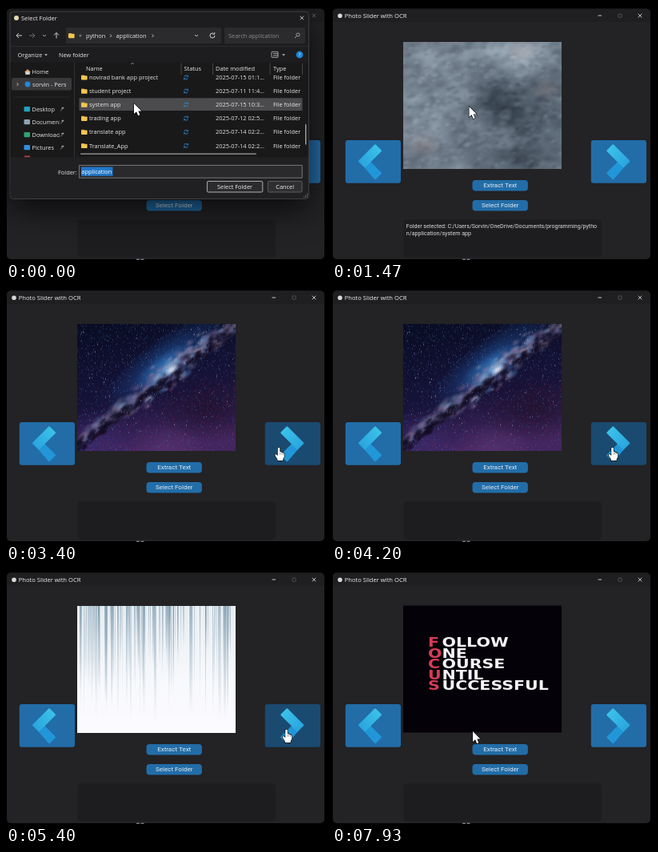
An HTML page with a canvas that plays this animation: 400 px wide and 318 px high, repeating every 8 s.

```html
<!DOCTYPE html>
<html lang="en">
<head>
<meta charset="utf-8">
<title>Photo Slider with OCR</title>
<style>
  html, body { margin: 0; width: 100%; height: 100%; overflow: hidden; background: #000; }
  canvas { display: block; width: 400px; height: 318px; }
</style>
</head>
<body>
<canvas id="stage"></canvas>
<script>
const W = 400, H = 318, LOOP = 8000;
const canvas = document.getElementById('stage');
const dpr = window.devicePixelRatio || 1;
canvas.width = W * dpr;
canvas.height = H * dpr;
const c = canvas.getContext('2d');
const UI = '"Open Sans", "Noto Sans", sans-serif';
const PIC = { x: 89, y: 44.5, w: 198, h: 159 };
const BLUE = '#226da8', HOVER = '#1a4a70';

// ---------- helpers ----------
function random(seed) {
  return () => {
    seed = (seed + 0x6D2B79F5) | 0;
    let n = Math.imul(seed ^ (seed >>> 15), 1 | seed);
    n = (n + Math.imul(n ^ (n >>> 7), 61 | n)) ^ n;
    return ((n ^ (n >>> 14)) >>> 0) / 4294967296;
  };
}

function box(x, y, w, h, fill, r = 0, stroke) {
  c.beginPath();
  c.roundRect(x, y, w, h, r);
  if (fill) { c.fillStyle = fill; c.fill(); }
  if (stroke) { c.strokeStyle = stroke; c.lineWidth = 0.8; c.stroke(); }
}

function dot(x, y, r, fill) {
  c.beginPath();
  c.arc(x, y, r, 0, 7);
  c.fillStyle = fill;
  c.fill();
}

function trace(points, close) {
  c.beginPath();
  for (let i = 0; i < points.length; i += 2) c.lineTo(points[i], points[i + 1]);
  if (close) c.closePath();
}

function line(color, width, ...points) {
  trace(points);
  c.strokeStyle = color;
  c.lineWidth = width;
  c.stroke();
}

// y is the middle of the capitals
function label(s, x, y, color = '#e8e8e8', size = 7.4, font = UI, align = 'left') {
  c.font = `${size}px ${font}`;
  c.textAlign = align;
  c.fillStyle = color;
  c.fillText(s, x, y + size * 0.36);
}

function clipped(s, x, y, right) {
  c.save();
  c.beginPath();
  c.rect(x, y - 8, right - x, 16);
  c.clip();
  label(s, x, y);
  c.restore();
}

function chevron(x, y, dx, dy, color = '#d0d0d0') {
  // points along (dx, dy)
  line(color, 0.9, x - dx - dy * 2, y - dy - dx * 2, x + dx, y + dy, x - dx + dy * 2, y - dy + dx * 2);
}

// ---------- pictures ----------
function picture(paint) {
  const p = document.createElement('canvas');
  p.width = PIC.w;
  p.height = PIC.h;
  paint(p.getContext('2d'), PIC.w, PIC.h);
  return p;
}

function soft(g, x, y, rx, ry, turn, rgb, alpha) {
  g.save();
  g.translate(x, y);
  g.rotate(turn);
  g.scale(rx, ry);
  const f = g.createRadialGradient(0, 0, 0, 0, 0, 1);
  f.addColorStop(0, `rgba(${rgb},${alpha})`);
  f.addColorStop(1, `rgba(${rgb},0)`);
  g.fillStyle = f;
  g.fillRect(-1, -1, 2, 2);
  g.restore();
}

const clouds = picture((g, w, h) => {
  const rnd = random(11);
  const bump = (x, y, cx, cy, s) => Math.exp(-((x - cx) ** 2 + (y - cy) ** 2) / (s * s));
  const light = (x, y) => 0.54 + 0.14 * bump(x, y, 45, 30, 45) + 0.34 * bump(x, y, 145, 15, 32)
    + 0.1 * bump(x, y, 25, 110, 40) - 0.32 * bump(x, y, 118, 72, 32)
    - 0.24 * bump(x, y, 165, 75, 34) - 0.26 * bump(x, y, 150, 152, 42);
  const tone = l => [34 + 138 * l, 44 + 142 * l, 56 + 144 * l].map(v => Math.round(v)).join();
  g.fillStyle = '#6f8799';
  g.fillRect(0, 0, w, h);
  for (let i = 0; i < 2200; i++) {
    const x = rnd() * w, y = rnd() * h, r = 2.5 + 20 * (1 - i / 2200) ** 2 * (0.4 + rnd());
    const l = Math.max(0, Math.min(1, light(x, y) + (rnd() - 0.5) * 0.65));
    soft(g, x, y, r * 1.6, r, -0.5 + rnd() * 0.5, tone(l), 0.36);
  }
  soft(g, 25, 130, 22, 15, 0, '180,150,140', 0.3);
  soft(g, 178, 60, 20, 14, 0, '170,140,135', 0.25);
  soft(g, 148, 12, 22, 14, 0, '196,188,186', 0.4);
});

const galaxy = picture((g, w, h) => {
  const rnd = random(5);
  const bell = () => rnd() + rnd() + rnd() - 1.5;
  const ridge = x => 149 - 0.75 * x;
  const TILT = -0.64;
  const sky = g.createLinearGradient(40, 0, 70, h);
  sky.addColorStop(0, '#090d24');
  sky.addColorStop(0.6, '#17133a');
  sky.addColorStop(1, '#43265f');
  g.fillStyle = sky;
  g.fillRect(0, 0, w, h);
  soft(g, 165, 105, 75, 45, 0, '32,17,44', 0.8);
  soft(g, 20, 150, 60, 40, 0, '60,46,120', 0.5);
  soft(g, 112, 158, 50, 36, 0, '96,58,118', 0.5);
  soft(g, 110, 48, 92, 30, TILT, '30,84,158', 0.75);
  soft(g, 108, 54, 46, 15, TILT, '62,140,208', 0.6);

  const tints = ['150,132,162', '84,138,190', '104,82,132', '168,152,172'];
  for (let i = 0; i < 520; i++) {
    const x = rnd() * 210 - 5, near = Math.exp(-(((x - 122) / 55) ** 2)), r = 1.5 + rnd() * 4;
    soft(g, x, ridge(x) + bell() * (9 + 10 * near), r * 1.7, r, TILT, tints[i % 4], 0.2 + 0.3 * near);
  }
  for (let i = 0; i < 190; i++) {
    const x = rnd() * 205, r = 1.5 + rnd() * 3.5;
    soft(g, x, ridge(x) + 6 + bell() * 9, r * 1.9, r, TILT + bell() * 0.5, '17,10,32', 0.75);
  }
  soft(g, 113, 58, 26, 9, TILT, '130,190,235', 0.6);
  soft(g, 118, 58, 10, 5, TILT, '240,242,252', 0.9);

  for (let i = 0; i < 2200; i++) {
    const x = rnd() * w, y = rnd() * h, low = y > ridge(x) + 20 ? y / h : 0;
    g.fillStyle = rnd() < low * 0.6 ? '#8f2c52' : ['#3168a0', '#28467c', '#4a88ba', '#6f72a8'][i % 4];
    g.globalAlpha = 0.15 + rnd() * 0.5;
    g.fillRect(Math.floor(x), Math.floor(y), 1, 1);
  }
  g.fillStyle = '#dfe6ff';
  for (let i = 0; i < 80; i++) {
    g.globalAlpha = 0.25 + rnd() * 0.5;
    g.fillRect(Math.floor(rnd() * w), Math.floor(rnd() * h), 1, 1);
  }
});

const streaks = picture((g, w, h) => {
  const rnd = random(23);
  const back = g.createLinearGradient(0, 0, 0, h);
  back.addColorStop(0, '#e6edf2');
  back.addColorStop(0.6, '#f8f9fc');
  back.addColorStop(1, '#fcfbff');
  g.fillStyle = back;
  g.fillRect(0, 0, w, h);
  for (let i = 0; i < 120; i++) {
    const len = 50 + rnd() * 100, f = g.createLinearGradient(0, 0, 0, len);
    const rgb = i % 4 ? '140,166,184' : i % 8 ? '255,255,255' : '92,122,142';
    f.addColorStop(0, `rgba(${rgb},${0.35 + rnd() * 0.5})`);
    f.addColorStop(0.4, `rgba(${rgb},0.35)`);
    f.addColorStop(1, `rgba(${rgb},0)`);
    g.fillStyle = f;
    g.fillRect(Math.floor(rnd() * w), 0, 1 + Math.floor(rnd() * rnd() * 3.5), len);
  }
});

function drawFocus() {
  box(PIC.x, PIC.y, PIC.w, PIC.h, '#040208');
  c.font = 'bold 15px "DejaVu Sans", sans-serif';
  c.textAlign = 'left';
  const wide = 1.37;
  c.save();
  c.scale(wide, 1);
  ['FOLLOW', 'ONE', 'COURSE', 'UNTIL', 'SUCCESSFUL'].forEach((word, i) => {
    const y = 96.2 + i * 13.5;
    c.fillStyle = '#d63c58';
    c.fillText(word[0], 120 / wide, y);
    c.fillStyle = '#f6f4f8';
    c.fillText(word.slice(1), 137.5 / wide, y);
  });
  c.restore();
}

// ---------- main window ----------
// drawn from the tip of the arrow; dir -1 points left, 1 points right
function arrowButton(x, tip, dir, fill) {
  box(x, 168, 69.2, 53.8, fill, 3);
  c.save();
  c.translate(tip, 168.3);
  c.scale(-dir, 1);
  c.lineJoin = 'round';
  const arm = (points, from, to) => {
    const f = c.createLinearGradient(2, 28, 28, 10);
    f.addColorStop(0, from);
    f.addColorStop(1, to);
    trace(points, true);
    c.fillStyle = c.strokeStyle = f;
    c.lineWidth = 2;
    c.fill();
    c.stroke();
  };
  arm([8, 33, 14, 27, 28, 41, 21, 48], '#2196d8', '#2196d8');
  arm([1, 26, 21, 6, 28, 13, 8, 33], '#2aa5de', '#3cc3ea');
  c.restore();
}

function pill(s, y) {
  box(175.5, y, 69.4, 13.6, BLUE, 4);
  label(s, 210.2, y + 6.5, '#e4ebf1', 8, 'Roboto, sans-serif', 'center');
}

function drawWindow(state) {
  box(1, 3.5, 397, 313.5, '#232225', 5);
  box(1, 3.5, 397, 16.5, '#1f1f21', [5, 5, 0, 0]);
  const ink = state.dialog ? '#777' : '#f0f0f0';
  dot(10, 12.2, 2.8, state.dialog ? '#777' : '#d8d8d8');
  label('Photo Slider with OCR', 15.8, 12.3, ink, 7.6);
  line(ink, 0.8, 332.5, 12, 337, 12);
  box(358, 10, 4.2, 4.2, null, 0.5, '#5a5a5a');
  line(ink, 0.8, 382.7, 9.8, 387.3, 14.4);
  line(ink, 0.8, 387.3, 9.8, 382.7, 14.4);

  if (state.pic === 'focus') drawFocus();
  else if (state.pic) c.drawImage(state.pic, PIC.x, PIC.y);

  arrowButton(16.8, 33, -1, BLUE);
  arrowButton(323.8, 372.3, 1, state.hover ? HOVER : BLUE);
  pill('Extract Text', 218);
  pill('Select Folder', 243);

  box(89.5, 267.5, 247.5, 47, '#1d1c1f', 4);
  if (state.path) {
    const out = (s, y) => label(s, 92.8, y, '#dcdcdc', 7.1, 'Roboto, sans-serif');
    out('Folder selected: C:/Users/Sorvin/OneDrive/Documents/programming/pytho', 275.5);
    out('n/application/system app', 284.2);
  }
  box(163, 316.6, 4, 1.4, '#77777a');
  box(168.5, 316.6, 4, 1.4, '#77777a');
}

// ---------- folder dialog ----------
function folder(x, y) {
  box(x, y - 3, 4, 2, '#d99a2b', 0.6);
  box(x, y - 2.2, 7.6, 5.4, '#f3c552', 0.8);
}

function syncMark(x, y) {
  c.strokeStyle = '#2a8ad4';
  c.lineWidth = 0.9;
  for (const a of [0.3, 3.44]) {
    c.beginPath();
    c.arc(x, y, 2.5, a, a + 2.4);
    c.stroke();
  }
  line('#2a8ad4', 0.8, x + 2.6, y - 2.8, x + 2.4, y - 0.9, x + 0.6, y - 1);
  line('#2a8ad4', 0.8, x - 2.6, y + 2.8, x - 2.4, y + 0.9, x - 0.6, y + 1);
}

function pin(x, y) {
  line('#9a9a9a', 0.8, x - 2.5, y + 2.5, x, y);
  line('#9a9a9a', 1.8, x - 1, y - 0.8, x + 1.8, y - 1.6);
}

function drawToolbar() {
  dot(13, 15, 3, '#e3d9b0');
  label('Select Folder', 19, 15.2, '#f2f2f2', 7.5);
  line('#e8e8e8', 0.8, 367.6, 12.6, 372.2, 17.2);
  line('#e8e8e8', 0.8, 372.2, 12.6, 367.6, 17.2);

  const ink = '#e0e0e0';
  line(ink, 0.9, 20, 37, 13, 37);
  line(ink, 0.9, 16, 34, 13, 37, 16, 40);
  line('#777', 0.9, 29, 37, 36, 37);
  line('#777', 0.9, 33, 34, 36, 37, 33, 40);
  chevron(48, 37, 0, 1, '#b0b0b0');
  line(ink, 0.9, 63, 40.5, 63, 33.5);
  line(ink, 0.9, 60, 36.5, 63, 33.5, 66, 36.5);

  box(75, 27, 194, 20, '#2b2b2d', 2);
  folder(78, 37);
  label('«', 91, 36.6, '#bbb');
  label('python', 100, 37.2);
  chevron(131, 37.3, 0.9, 0);
  label('application', 137.5, 37.2);
  chevron(183.5, 37.3, 0.9, 0);
  chevron(238, 37, 0, 1);
  c.beginPath();
  c.arc(258, 37, 3, 0, 5.2);
  c.strokeStyle = ink;
  c.lineWidth = 0.9;
  c.stroke();
  line(ink, 0.9, 260.8, 33, 260.6, 35.3, 258.4, 35.3);

  box(273, 27, 101, 20, '#2b2b2d', 2);
  label('Search application', 278, 37.2, '#8d8d8d');
  c.beginPath();
  c.arc(365, 36, 2.1, 0, 7);
  c.strokeStyle = '#b5b5b5';
  c.lineWidth = 0.8;
  c.stroke();
  line('#b5b5b5', 0.9, 363.4, 37.6, 361, 40);

  label('Organize', 14.5, 61);
  label('New folder', 66, 61);
  for (const x of [50, 347]) {
    trace([x - 2, 60.2, x + 2, 60.2, x, 62.6], true);
    c.fillStyle = '#bbb';
    c.fill();
  }
  box(332, 57.3, 8, 7, null, 0.5, '#c4c4c4');
  line('#c4c4c4', 0.8, 334, 59.6, 340, 59.6);
  line('#c4c4c4', 0.8, 334, 62, 340, 62);
  dot(367, 61, 4.4, '#1f86d8');
  label('?', 367, 61, '#fff', 6, UI, 'center');
}

function drawNav() {
  trace([23, 83, 27, 79, 31, 83], true);
  c.fillStyle = '#e0a36a';
  c.fill();
  box(24.2, 82.4, 5.6, 3.4, '#d8d8d8');
  label('Home', 32.5, 82.3);
  box(7, 90, 75, 15.5, '#39393b', 2);
  chevron(14.5, 98, 0.9, 0);
  dot(27, 98, 3.4, '#2089dc');
  clipped('sorvin - Personal', 33, 98, 75);
  line('#333', 0.7, 10, 114, 80, 114);
  [['Desktop', '#1fa3bd'], ['Documents', '#8fa3b5'], ['Downloads', '#2fa36f'], ['Pictures', '#2f8fe0']]
    .forEach(([name, color], i) => {
      const y = 129 + i * 16;
      box(22.5, y - 3, 7.5, 6.2, color, 1);
      clipped(name, 32.5, y, 66.5);
      pin(70.5, y);
    });
  box(23, 187.6, 7, 1.6, '#c9433f');
}

function drawList(picked) {
  label('Name', 100, 78.6);
  label('Status', 222.5, 78.6);
  label('Date modified', 262, 78.6);
  label('Type', 334, 78.6);
  for (const x of [219, 258.5, 330, 370.5]) line('#505050', 0.8, x, 71.5, x, 86);
  line('#a0a0a0', 0.8, 156, 73, 158, 71.2, 160, 73);

  box(91.5, 115.3, 279, 15.6, picked ? '#666' : '#4b4b4d');
  const rows = [
    ['novirad bank app project', '2025-07-15 01:1...'],
    ['student project', '2025-07-11 11:4...'],
    ['system app', '2025-07-15 10:3...'],
    ['trading app', '2025-07-12 02:5...'],
    ['translate app', '2025-07-14 02:2...'],
    ['Translate_App', '2025-07-14 02:2...']
  ];
  c.save();
  c.beginPath();
  c.rect(86, 86, 290, 103);
  c.clip();
  rows.forEach(([name, date], i) => {
    const y = 89.4 + i * 17.1;
    folder(94, y);
    label(name, 104, y);
    syncMark(225, y);
    label(date, 262, y);
    label('File folder', 334, y);
  });
  c.restore();
  box(93, 184.4, 220, 1.3, '#a2a2a2', 0.6);
  box(374, 148, 1.4, 25.5, '#a2a2a2', 0.6);
}

function drawDialog(picked) {
  c.save();
  c.shadowColor = 'rgba(0,0,0,0.75)';
  c.shadowBlur = 42 * dpr;
  c.shadowOffsetY = 12 * dpr;
  box(5, 7, 373.5, 234.5, '#1d1d1f', 4);
  c.restore();
  box(5, 7, 373.5, 234.5, '#1d1d1f', 4, '#48484a');
  box(5.5, 70, 372.5, 119.5, '#19191a');
  line('#303032', 0.8, 5.5, 50.5, 378, 50.5);
  line('#38383a', 0.8, 85.5, 70, 85.5, 189);
  drawToolbar();
  drawNav();
  drawList(picked);

  box(5.5, 189.5, 372.5, 51.5, '#202022', [0, 0, 4, 4]);
  label('Folder:', 65, 208.2);
  box(91.4, 199.4, 278.8, 15.8, '#2a2a2c', 0, '#8c8c8e');
  const name = picked ? 'system app' : 'application';
  if (!picked) box(94, 201.4, 39.5, 11.4, '#2277c8');
  label(name, 94.3, 207, '#fff');
  box(251.4, 219.4, 69.4, 13.6, '#2b2b2d', 1.5, '#d6d6d6');
  label('Select Folder', 286, 226.3, '#f0f0f0', 7.4, UI, 'center');
  box(327.4, 219.4, 42.6, 13.6, '#2f2f31', 1.5, '#6c6c6e');
  label('Cancel', 348.7, 226.3, '#f0f0f0', 7.4, UI, 'center');
  for (let i = 0; i < 3; i++)
    for (let j = 0; j <= i; j++) box(376 - j * 2, 234.8 + i * 2, 1, 1, '#8a8a8a');
}

// ---------- pointer ----------
const PATH = [
  [0, 160, 122], [200, 160, 122], [600, 283, 224], [750, 283, 224], [1400, 171.5, 126],
  [1850, 171.5, 126], [2730, 220.5, 239.5], [3130, 341, 199.5], [3530, 341, 199.5],
  [3700, 350.5, 199.5], [7660, 350.5, 199.5], [7930, 176, 202], [LOOP, 176, 202]
];

function pointerAt(t) {
  const i = PATH.findIndex((p, n) => n && t <= p[0]);
  const [t0, x0, y0] = PATH[i - 1], [t1, x1, y1] = PATH[i];
  const u = (t - t0) / (t1 - t0), e = u * u * (3 - 2 * u);
  return [x0 + (x1 - x0) * e, y0 + (y1 - y0) * e];
}

function drawPointer(x, y, hand) {
  c.save();
  c.translate(x, y);
  c.scale(0.92, 0.92);
  c.lineJoin = 'round';
  if (hand) {
    trace([-1.4, 0.8, 0, 0, 1.4, 0.8, 1.5, 6, 3.6, 6.2, 4, 7, 5.6, 7, 6, 8, 7.2, 8.3,
      7.4, 13, 5.8, 15.4, 5.6, 18, -1.6, 18, -2, 15.8, -4.8, 11.6, -5, 9.6, -3.4, 9.4, -1.4, 11.4], true);
  } else {
    trace([0, 0, 0, 14.2, 3.3, 11.2, 5.6, 16.6, 8, 15.5, 5.8, 10.3, 10.2, 10.2], true);
  }
  c.strokeStyle = '#000';
  c.lineWidth = 1.3;
  c.stroke();
  c.fillStyle = '#fff';
  c.fill();
  if (hand) {
    for (const k of [1.6, 3.6, 5.5]) line('#444', 0.5, k, 6.5, k, 10);
  }
  c.restore();
}

// ---------- timeline ----------
const SLIDES = [[930, clouds], [3270, galaxy], [4800, streaks], [6500, 'focus']];
const STEP = 1000 / 15;

function draw(ms) {
  const t = Math.floor((ms + 4) / STEP) * STEP % LOOP;
  const [x, y] = pointerAt(t);
  const over = x > 324 && x < 393 && y > 168 && y < 222;
  const slide = SLIDES.filter(s => t >= s[0] - 4).pop();
  const pressed = slide && t - slide[0] < 90;
  const dialog = t < 790;
  c.setTransform(dpr, 0, 0, dpr, 0, 0);
  c.fillStyle = '#000';
  c.fillRect(0, 0, W, H);
  drawWindow({
    dialog,
    pic: slide && slide[1],
    path: slide && slide[1] === clouds,
    hover: over && !pressed
  });
  if (dialog) drawDialog(t > 190);
  drawPointer(x, y, over);
}

function tick() {
  draw(performance.now() % LOOP);
  requestAnimationFrame(tick);
}
tick();
</script>
</body>
</html>
```
